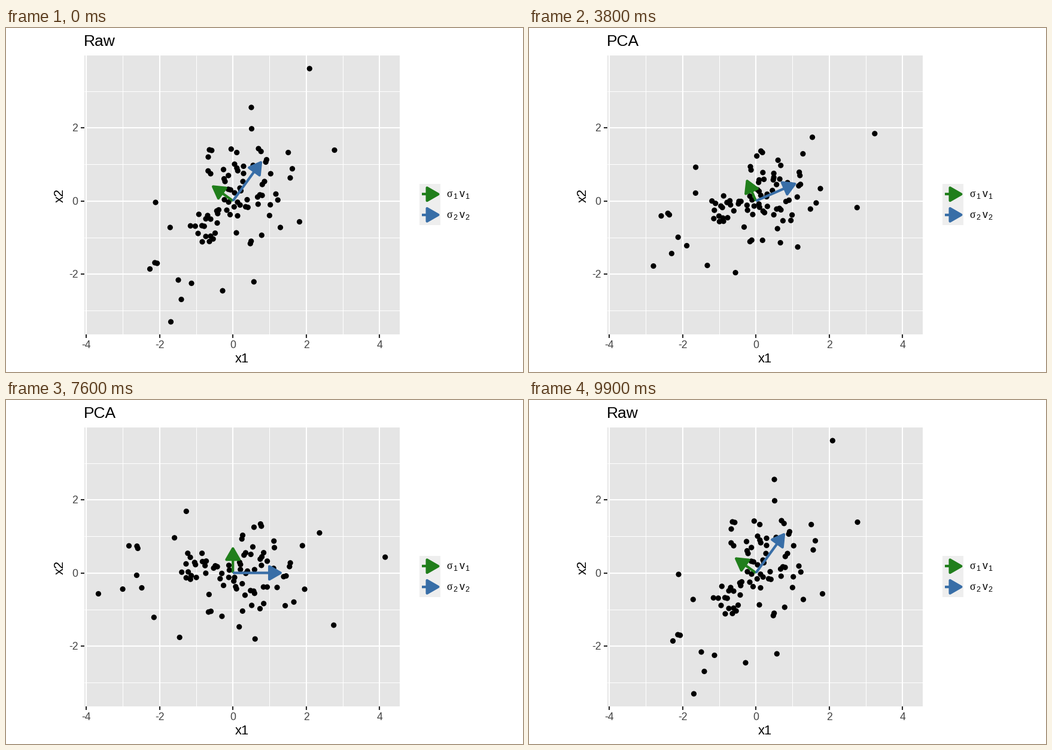
Recreate the animation shown at these times as a matplotlib script. Size 864 by 576 pixels, loop 10000 ms.

```python
import numpy as np
import matplotlib.pyplot as plt
from matplotlib.animation import FuncAnimation
from matplotlib.patches import Polygon, Rectangle

W, H, DPI = 864, 576, 144
FRAMES, HOLD, MOVE = 100, 25, 25
ORIGIN = np.array([379.2, 289.5])
UNIT = 61.25
LEFT, RIGHT, TOP, BOTTOM = 130.5, 658, 46, 513
GREEN, BLUE = "#207e1b", "#386ea7"
TICK_GREY, LABEL_GREY = "#2b2b2b", "#444444"
ANGLE = np.radians(54.05)

# Scatter in stage pixels: lone points, then points with a close companion.
LONE = [
    (507.3, 68), (410, 133), (410.5, 168.7), (338, 216), (376.3, 202.7),
    (385.7, 208.5), (471.7, 208.5), (549, 204.5), (382, 228), (397, 231.5),
    (397, 243.5), (442.3, 244), (478.5, 235.7), (475, 251), (363.5, 237),
    (371.7, 247), (396, 257), (428.3, 262), (432, 257), (420.5, 283),
    (421.3, 295), (441.7, 296), (451, 278), (454.3, 288), (440.4, 314),
    (490.5, 324.5), (458.5, 334), (427.3, 347), (414.3, 425), (362, 440),
    (385, 343), (387, 314.5), (374.5, 312.5), (369, 305), (381.3, 299.5),
    (403, 287.5), (372, 291.5), (365, 287.5), (382, 276), (250, 292),
    (274.3, 334), (322.3, 312), (337, 314), (355.5, 304.5), (353, 326.5),
    (321, 344), (349.5, 343.5), (328, 358), (334, 349), (340, 357.5),
    (240.5, 403.5), (288, 422), (310, 427.5), (293, 454.5), (275.5, 492),
]
PAIRED = {
    (3.8, 1): [(340, 204), (248.8, 393), (424.3, 279.3), (327.5, 331),
               (371.5, 270), (400.5, 299.3)],
    (1.5, 4.5): [(385.8, 234.5), (391, 268), (352.3, 306.3), (364.5, 252.5)],
    (4.2, 4.7): [(422, 202), (387, 291.7), (337.8, 239.3), (342, 348.5)],
    (-1.4, 4): [(409.7, 357), (435.5, 220.5)],
    (8, 0.5): [(308.3, 331.3), (413, 230), (334, 319.5)],
}


def rotate(v, a):
    """Clockwise on screen, where y points down."""
    c, s = np.cos(a), np.sin(a)
    return np.asarray(v) @ np.array([[c, s], [-s, c]])


def ease(t):
    return 4 * t ** 3 if t < 0.5 else 1 - 4 * (1 - t) ** 3


dots = [np.array(LONE)]
for step, anchors in PAIRED.items():
    dots += [np.array(anchors), np.array(anchors) + step]
raw_dots = np.vstack(dots) - ORIGIN
pca_dots = rotate(raw_dots, ANGLE)
pca_tips = np.array([(0, -0.667), (1.3, 0)]) * UNIT
raw_tips = rotate(pca_tips, -ANGLE)

plt.rcParams["font.family"] = "Liberation Sans"
fig = plt.figure(figsize=(W / DPI, H / DPI), dpi=DPI, facecolor="white")
ax = fig.add_axes([0, 0, 1, 1])
ax.set_xlim(0, W)
ax.set_ylim(H, 0)
ax.axis("off")


def box(x0, y0, x1, y1, color):
    ax.add_patch(Rectangle((x0, y0), x1 - x0, y1 - y0, fc=color, lw=0, zorder=0))


def line(xs, ys, color, width, z=1):
    return ax.plot(xs, ys, color=color, lw=width, zorder=z,
                   solid_capstyle="butt")[0]


def text(x, y, s, size, color="black", **kw):
    kw = {"ha": "left", "va": "baseline", **kw}
    return ax.text(x, y, s, fontsize=size, color=color, **kw)


class Arrow:
    HEAD = 21.6

    def __init__(self, color, z):
        self.shaft = line([0, 0], [0, 0], color, 2.13, z)
        self.head = ax.add_patch(Polygon(np.zeros((3, 2)), fc=color, ec=color,
                                         lw=2.13, joinstyle="round", zorder=z))

    def place(self, start, tip):
        start, tip = np.asarray(start), np.asarray(tip)
        back = (start - tip) / np.hypot(*(start - tip)) * self.HEAD
        self.shaft.set_data([start[0], tip[0]], [start[1], tip[1]])
        self.head.set_xy([tip + rotate(back, np.pi / 6), tip,
                          tip + rotate(back, -np.pi / 6)])


def draw_axes():
    box(LEFT, TOP, RIGHT, BOTTOM, "#e5e5e5")
    for v in range(-4, 5):
        x, y = ORIGIN[0] + v * UNIT, ORIGIN[1] - v * UNIT
        major = v % 2 == 0
        width, z = (1.07, 2) if major else (0.53, 1)
        line([x, x], [TOP, BOTTOM], "white", width, z)
        if major:
            line([x, x], [BOTTOM, BOTTOM + 5.5], TICK_GREY, 1.07)
            text(x, 536, str(v), 8.8, LABEL_GREY, ha="center")
        if abs(v) < 4:
            line([LEFT, RIGHT], [y, y], "white", width, z)
            if major:
                line([LEFT - 5.5, LEFT], [y, y], TICK_GREY, 1.07)
                text(120.3, y + 6.3, str(v), 8.8, LABEL_GREY, ha="right")
    text(394, 560.5, "x1", 11, ha="center")
    text(96, 280, "x2", 11, ha="center", rotation=90, rotation_mode="anchor")


def draw_legend():
    key, left, top = 34.56, 691.2, 261
    box(left, top, left + key, top + 2 * key, "#eeeeee")
    for i, color in enumerate((GREEN, BLUE)):
        y = top + (i + 0.5) * key
        Arrow(color, 3).place((left + 0.1 * key, y), (left + 0.9 * key, y))
        text(736.5, y + 5, "σ", 8.8, family="Liberation Serif")
        text(747, y + 8, str(i + 1), 6.2)
        text(757.5, y + 5, "v", 8.8)
        text(767, y + 8, str(i + 1), 6.2)


draw_axes()
draw_legend()
title = text(129.8, 30, "Raw", 13.2)
cloud = ax.scatter(*(raw_dots + ORIGIN).T, s=np.full(len(raw_dots), 21.2),
                   c="black", linewidths=0, zorder=4)
arrows = [Arrow(GREEN, 5), Arrow(BLUE, 6)]


def progress(i):
    """0 is the raw pose, 1 the rotated one."""
    half, k = divmod(i, HOLD + MOVE)
    p = ease(max(0, k - HOLD) / MOVE)
    return 1 - p if half else p


def draw(i):
    p = progress(i)
    title.set_text("PCA" if p > 0.5 else "Raw")
    cloud.set_offsets(ORIGIN + raw_dots + p * (pca_dots - raw_dots))
    for arrow, tip in zip(arrows, raw_tips + p * (pca_tips - raw_tips)):
        arrow.place(ORIGIN, ORIGIN + tip)
    return [title, cloud]


anim = FuncAnimation(fig, draw, frames=FRAMES, interval=100, repeat=True,
                     repeat_delay=0)
plt.show()
```
